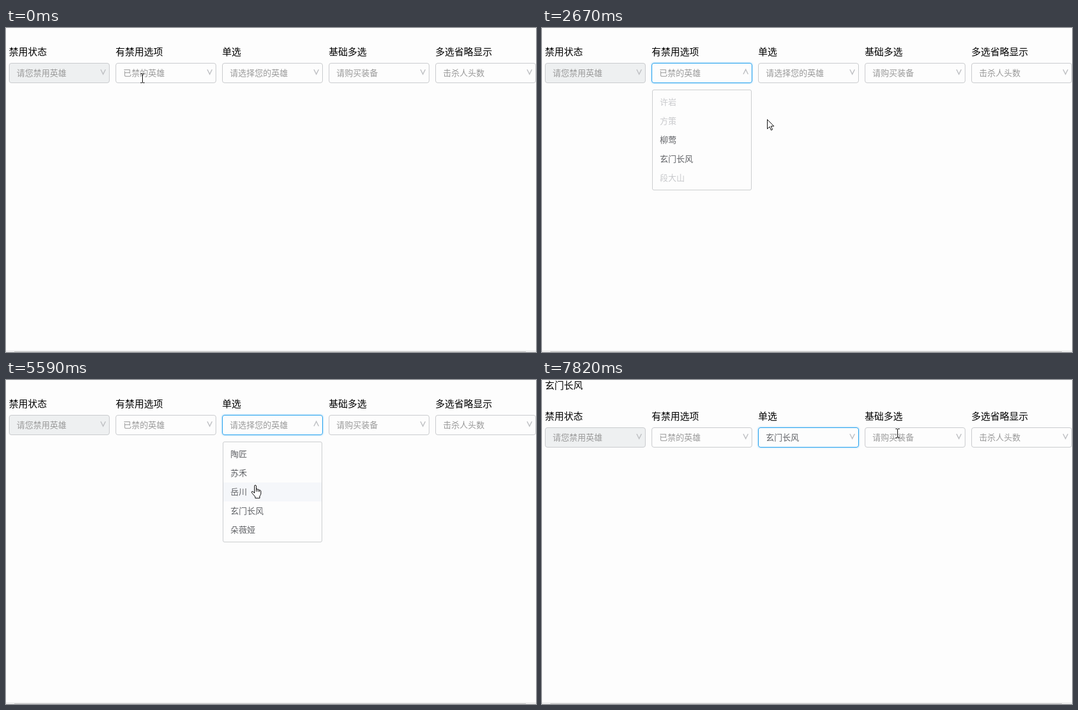
Recreate the animation shown at these times as an HTML page. Size 895x547 px, loop 8000 ms.

```html
<!DOCTYPE html>
<html lang="zh-CN">
<head>
<meta charset="utf-8">
<title>下拉选择</title>
<style>
  html, body { margin: 0; width: 100%; height: 100%; overflow: hidden; background: #fdfdfd; }
  body { position: relative; font: 14px/20px "Noto Sans CJK SC", "Noto Sans CJK", sans-serif; }
  div, svg { position: absolute; box-sizing: border-box; white-space: nowrap; }
  #form { left: 0; top: 0; }
  .label { top: 29px; font-size: 16px; color: #000; }
  .box { top: 59px; width: 170px; height: 34px; border: 1px solid #c6c8cb; border-radius: 4px; }
  .box.off { background: #eef0f1; }
  .box.mid { border-color: #a9c2d6; }
  .box.on { border-color: #20a0ef; box-shadow: 0 0 3px rgba(32, 160, 240, .6); }
  .text { left: 12px; top: 5px; color: #999; }
  .text.set { color: #606266; }
  .arrow { left: 152px; top: 8px; width: 12px; height: 12px; fill: none; stroke: #bfc1c4; stroke-width: 1.6; }
  .list { top: 104px; width: 168px; height: 170px; border: 1px solid #c8cacc; border-radius: 3px; background: #fdfdfd; }
  .item { left: 0; width: 166px; height: 32px; padding: 5px 12px; color: #606266; }
  .item.no { color: #c8c9cc; }
  .item.hot { background: #f5f7fa; }
  #picked { left: 5px; top: -2px; font-size: 16px; color: #000; }
  #rail { left: 0; right: 0; top: 544px; height: 3px; background: #efefef; }
  #thumb { left: 14px; width: 864px; top: 546px; height: 1px; background: #bcbcbc; }
  .cursor { left: 0; top: 0; overflow: visible; fill: #fff; stroke: #000; stroke-linejoin: round; }
</style>
</head>
<body>
<div id="picked"></div>
<div id="form"></div>
<div id="rail"></div>
<div id="thumb"></div>

<svg class="cursor" id="beam" width="7" height="16" shape-rendering="crispEdges">
  <path fill="none" d="M0 .5H3M4 .5H7M3.5 1V15M0 15.5H3M4 15.5H7"/>
</svg>
<svg class="cursor" id="point" width="12" height="19">
  <path d="M.5 .5V16.3L4.3 12.7 6.9 18.5 9.2 17.5 6.7 11.8H11.6Z"/>
</svg>
<svg class="cursor" id="hand" width="17" height="23">
  <path d="M5.5 14V2.2Q5.5.6 7 .6T8.5 2.2V7.2Q10.2 6.3 11.2 7.8Q12.9 7.2 13.7 8.8Q16.4 8.6 16.4 11V15Q16 17.5 14.5 19V22.4H6.8V20Q4.5 17.5 1 13.2Q.2 11.2 2 11Q3.5 11 5.5 14Z"/>
  <path fill="none" d="M8.5 7V11.5M11.2 8V11.5M13.7 9V12"/>
</svg>
<svg class="cursor" id="ban" width="16" height="16">
  <g fill="none">
    <path id="ring" d="M2.5 8a5.5 5.5 0 1 0 11 0a5.5 5.5 0 1 0-11 0M4.2 4.2L11.8 11.8" stroke="#fff" stroke-width="4.4"/>
    <path d="M2.5 8a5.5 5.5 0 1 0 11 0a5.5 5.5 0 1 0-11 0M4.2 4.2L11.8 11.8" stroke-width="2"/>
  </g>
</svg>

<script>
const LOOP = 8000;
const CHOICE = '玄门长风';
const FIELDS = [
  ['禁用状态', '请您禁用英雄'],
  ['有禁用选项', '已禁的英雄'],
  ['单选', '请选择您的英雄'],
  ['基础多选', '请购买装备'],
  ['多选省略显示', '击杀人头数']
];

// time, cursor, left, top
const MOVES = [
  [0, 'beam', 227, 77], [700, 'beam', 228, 78], [820, 'beam', 229, 79],
  [940, 'ban', 234, 106], [1090, 'ban', 234, 121], [1500, 'ban', 235, 136],
  [1650, 'ban', 237, 147], [1930, 'ban', 250, 147], [2050, 'ban', 270, 147],
  [2200, 'ban', 310, 146], [2480, 'point', 371, 154], [2670, 'point', 380, 154],
  [3090, 'point', 438, 75], [3410, 'point', 439, 74], [3550, 'beam', 438, 66],
  [4410, 'beam', 439, 68], [4550, 'point', 440, 92], [4670, 'point', 437, 109],
  [4790, 'hand', 427, 116], [4910, 'hand', 428, 122], [5200, 'hand', 422, 145],
  [5320, 'hand', 416, 167], [5470, 'hand', 414, 177], [5600, 'hand', 412, 187],
  [5720, 'hand', 411, 195], [5870, 'hand', 410, 202], [5990, 'hand', 409, 209],
  [6140, 'hand', 409, 213], [6260, 'hand', 409, 216], [6380, 'hand', 409, 219],
  [7270, 'point', 414, 218], [7420, 'point', 423, 214], [7570, 'point', 474, 178],
  [7690, 'point', 545, 126], [7820, 'beam', 597, 82]
];

// time, value
const LIST_A = [[0, 0], [460, .88], [700, .95], [820, 1], [3730, 0]];
const LIST_B = [[0, 0], [3860, .4], [4010, .85], [4130, 1], [7150, 0]];
const FOCUS_A = [[0, ''], [460, 'on'], [3730, 'mid'], [3860, '']];
const FOCUS_B = [[0, ''], [3860, 'mid'], [4010, 'on']];
const TURN_A = [[0, 0], [460, 40], [700, 180], [3860, 0]];
const TURN_B = [[0, 0], [4010, 140], [4130, 180], [7270, 0]];
const DONE = 7150;

const $ = id => document.getElementById(id);
const form = $('form');
const cursors = ['beam', 'point', 'hand', 'ban'].map($);

function add(parent, cls, text = '') {
  const el = document.createElement('div');
  el.className = cls;
  el.textContent = text;
  parent.append(el);
  return el;
}

const fields = FIELDS.map(([name, hint], i) => {
  const x = 5 + 180 * i;
  add(form, 'label', name).style.left = x + 'px';
  const box = add(form, i ? 'box' : 'box off');
  box.style.left = x + 'px';
  const text = add(box, 'text', hint);
  box.insertAdjacentHTML('beforeend',
    '<svg class="arrow" viewBox="0 0 12 12"><path d="M2 2L6 10L10 2"/></svg>');
  return { box, text, hint, arrow: box.lastChild };
});

function addList(x, names, disabled = []) {
  const el = add(form, 'list');
  el.style.left = x + 'px';
  const items = names.map((name, i) => {
    const item = add(el, disabled.includes(i) ? 'item no' : 'item', name);
    item.style.top = 4 + 32 * i + 'px';
    return item;
  });
  return { el, items };
}

const listA = addList(186, ['许岩', '方策', '柳莺', CHOICE, '段大山'], [0, 1, 4]);
const listB = addList(366, ['陶匠', '苏禾', '岳川', CHOICE, '朵薇娅']);

const at = (steps, t) => steps.findLast(s => s[0] <= t);

function drawSelect(field, list, t, fade, focus, turn) {
  list.el.style.opacity = at(fade, t)[1];
  field.box.className = 'box ' + at(focus, t)[1];
  field.arrow.style.transform = `rotate(${at(turn, t)[1]}deg)`;
}

function draw(t) {
  const [, kind, x, y] = at(MOVES, t);
  for (const c of cursors) {
    c.style.display = c.id === kind ? 'block' : 'none';
    c.style.transform = `translate(${x}px, ${y}px)`;
  }

  drawSelect(fields[1], listA, t, LIST_A, FOCUS_A, TURN_A);
  drawSelect(fields[2], listB, t, LIST_B, FOCUS_B, TURN_B);
  const row = kind === 'hand' ? Math.floor((y - 109) / 32) : -1;
  listB.items.forEach((item, i) => item.classList.toggle('hot', i === row));

  const done = t >= DONE;
  form.style.top = done ? '21px' : '0';
  $('picked').textContent = done ? CHOICE : '';
  fields[2].text.textContent = done ? CHOICE : fields[2].hint;
  fields[2].text.classList.toggle('set', done);
}

const start = performance.now();
function tick() {
  draw((performance.now() - start) % LOOP);
  requestAnimationFrame(tick);
}
tick();
</script>
</body>
</html>
```
